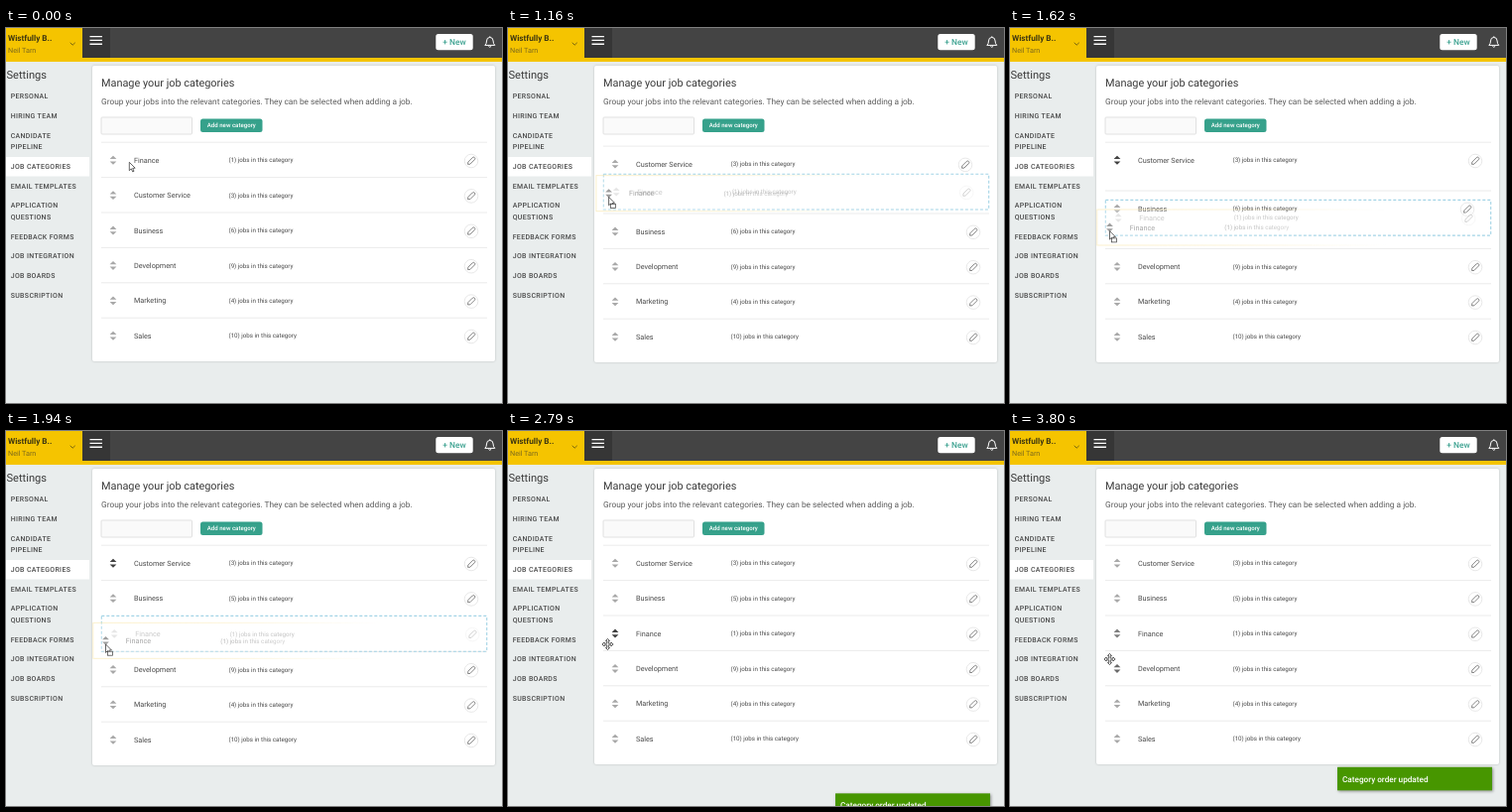
Animation, 500 px wide and 378 px high, one loop 3880 ms. Source, as an HTML page:

```html
<!DOCTYPE html>
<html lang="en">
<head>
<meta charset="utf-8">
<title>Job categories</title>
<style>
  html, body { margin: 0; width: 100%; height: 100%; overflow: hidden; background: #e9eded; }
  svg { display: block; width: 500px; height: 378px; font-family: Roboto, sans-serif; text-rendering: geometricPrecision; }
  .nav { font-size: 6.95px; font-weight: 500; letter-spacing: .36px; fill: #484848; }
  .name { font-size: 7.26px; fill: #4a4a4a; }
  .count { font-size: 6.23px; fill: #4a4a4a; }
  .card { filter: drop-shadow(0 .5px .8px #0003); }
  .toast { filter: drop-shadow(1.5px 1.5px 1.5px #0006); }
</style>
</head>
<body>
<svg viewBox="0 0 500 378">
  <defs>
    <linearGradient id="fade">
      <stop offset="0" stop-color="#fff"/>
      <stop offset=".35" stop-color="#bbb"/>
      <stop offset=".75" stop-color="#000"/>
    </linearGradient>
    <mask id="soft" maskUnits="userSpaceOnUse" x="80" y="-20" width="410" height="40">
      <rect x="80" y="-20" width="410" height="40" fill="url(#fade)"/>
    </mask>
    <g id="pencil">
      <circle r="6.8" fill="#fff" stroke="#e2e2e2" stroke-width=".8"/>
      <path d="M-4.8 0 L-3 -1.5 H3.4 Q4.8 -1.5 4.8 0 Q4.8 1.5 3.4 1.5 H-3 Z"
        transform="rotate(-45)" fill="none" stroke="#666" stroke-width=".75" stroke-linejoin="round"/>
    </g>
    <path id="sort" d="M-3.4 -1.1 L0 -4.4 L3.4 -1.1 Z M-3.4 1.2 L0 4.5 L3.4 1.2 Z"/>
  </defs>

  <rect width="500" height="378" fill="#e9eded"/>
  <rect width="500" height="30" fill="#444"/>
  <rect x="77" width="28" height="30" fill="#363636"/>
  <path d="M0 0 H77 V30 H500 V34 H0 Z" fill="#f5c400"/>
  <text x="2" y="13" font-size="8.2" font-weight="700" fill="#3d3610">Wistfully B..</text>
  <text x="2" y="24.6" font-size="7.2" fill="#7d6a1c">Neil Tarn</text>
  <path d="M64.7 14.8 L67.2 17.2 L69.7 14.8" fill="none" stroke="#6b5a10" stroke-width=".9"/>
  <path d="M84.5 8.6 H97 M84.5 12.4 H97 M84.5 16.2 H97" stroke="#fff" stroke-width="1.4"/>
  <rect x="433.3" y="6" width="37.4" height="16.3" rx="2.5" fill="#fff"/>
  <text x="452" y="17.2" font-size="8.4" font-weight="500" fill="#3fa392" text-anchor="middle">+ New</text>
  <path d="M482.8 17.4 Q484.5 16 484.5 13 Q484.5 9.6 487.8 9.4 Q491.1 9.6 491.1 13 Q491.1 16 492.8 17.4 Z M486.4 18.3 Q487.8 20.3 489.2 18.3 M487.8 9.4 V8.3"
    fill="none" stroke="#fff" stroke-width="1"/>

  <text x=".5" y="50.8" font-size="11.1" fill="#3a3a3a">Settings</text>
  <rect y="130" width="84" height="19.5" fill="#fff"/>
  <g id="nav"></g>

  <rect id="card" class="card" x="87" y="38" width="406" height="298" rx="2" fill="#fff"/>
  <text x="96" y="58.8" font-size="10.9" fill="#3a3a3a">Manage your job categories</text>
  <text x="96" y="77.2" font-size="8.32" fill="#5c5c5c">Group your jobs into the relevant categories. They can be selected when adding a job.</text>
  <rect x="96" y="90" width="91.5" height="17" rx="1" fill="#fafafa" stroke="#dedede" stroke-width=".9"/>
  <rect x="196" y="91.5" width="62.5" height="13.5" rx="2.5" fill="#36a18b"/>
  <text x="227.3" y="100.4" font-size="6.1" font-weight="500" fill="#fff" text-anchor="middle">Add new category</text>

  <g id="rows"></g>

  <g id="ghost">
    <g mask="url(#soft)">
      <rect x="96" y="-18" width="389" height="36" fill="#fff" fill-opacity=".25" stroke="#f8e7b0" stroke-opacity=".75" stroke-width=".9"/>
      <use href="#sort" x="108.7" fill="#999"/>
      <text class="name" x="129" y="2.6" opacity=".55">Finance</text>
      <text class="count" x="224.5" y="2.2" opacity=".55">(1) jobs in this category</text>
    </g>
  </g>

  <g id="toast" class="toast">
    <rect x="330" width="156" height="23.5" fill="#479600"/>
    <text x="335" y="14.8" font-size="8.2" font-weight="500" fill="#fff">Category order updated</text>
  </g>

  <g id="cursor">
    <path id="arrow" d="M0 0 V8.4 L2 6.6 L3.4 9.6 L4.7 9 L3.4 6.1 L5.9 5.9 Z" fill="#fff" stroke="#333" stroke-width=".75"/>
    <rect id="box" x="2" y="7.2" width="5" height="4" fill="#fff" stroke="#444" stroke-width=".75"/>
    <path id="move" d="M0 -5.6 L2 -3.4 H.8 V-.8 H3.4 V-2 L5.6 0 L3.4 2 V.8 H.8 V3.4 H2 L0 5.6 L-2 3.4 H-.8 V.8 H-3.4 V2 L-5.6 0 L-3.4 -2 V-.8 H-.8 V-3.4 H-2 Z"
      fill="#fff" stroke="#333" stroke-width=".8"/>
  </g>
</svg>
<script>
const LOOP = 3880, STEP = LOOP / 50;
const DRAG = 720, LIFT = 840, DROP = 2480, LEAVE = 3650;
const SWAP = 150, FADE = 250;
const TOP = 133.2, PITCH = 35.4;
const $ = id => document.getElementById(id);

function add(parent, tag, attrs, text) {
  const el = document.createElementNS('http://www.w3.org/2000/svg', tag);
  for (const k in attrs) el.setAttribute(k, attrs[k]);
  if (text) el.textContent = text;
  return parent.appendChild(el);
}
const move = (el, x, y) => el.setAttribute('transform', `translate(${x} ${y})`);
const show = (el, on) => el.setAttribute('visibility', on ? 'visible' : 'hidden');
const ramp = (t, from, to) => Math.min(1, Math.max(0, (t - from) / (to - from)));
const easeOut = (u, power) => 1 - (1 - u) ** power;
const mix = (a, b, u) => a + (b - a) * u;

let navY = 71.4;
for (const item of ['PERSONAL', 'HIRING TEAM', 'CANDIDATE|PIPELINE', 'JOB CATEGORIES', 'EMAIL TEMPLATES',
  'APPLICATION|QUESTIONS', 'FEEDBACK FORMS', 'JOB INTEGRATION', 'JOB BOARDS', 'SUBSCRIPTION']) {
  item.split('|').forEach((label, i) => {
    navY += i * 11.3;
    add($('nav'), 'text', { class: 'nav', x: 4.7, y: navY }, label);
  });
  navY += 19.75;
}

const jobs = n => `(${n}) jobs in this category`;

function makeRow([name, n]) {
  const g = add($('rows'), 'g');
  const line = add(g, 'path', { d: 'M96 -18 H485', stroke: '#e9e9e9', 'stroke-width': .9 });
  const body = add(g, 'g');
  const sort = add(body, 'use', { href: '#sort', x: 108 });
  add(body, 'text', { class: 'name', x: 129, y: 2.6 }, name);
  const count = add(body, 'text', { class: 'count', x: 224.5, y: 2.2 }, jobs(n));
  const pencil = add(body, 'use', { href: '#pencil', x: 469, y: .8 });
  return { g, line, body, sort, count, pencil };
}
const rows = Object.entries({ Finance: 1, 'Customer Service': 3, Business: 6,
  Development: 9, Marketing: 4, Sales: 10 }).map(makeRow);
const [finance, service, business, development] = rows;
$('rows').append(finance.g);
const dashes = add(finance.g, 'rect', { x: 96.3, y: -17.9, width: 388.4, height: 35.8, fill: 'none',
  stroke: '#a3d4e6', 'stroke-width': 1.1, 'stroke-dasharray': '3 2' });

// Pointer over a row's handle: [enter, leave].
finance.hover = [DROP, LEAVE];
service.hover = [1240, DROP - STEP];
development.hover = [LEAVE, LOOP];

function pointer(t) {
  const reach = ramp(t, 0, 2 * STEP), drag = ramp(t, LIFT, 1940), leave = ramp(t, LEAVE - STEP, LOOP - STEP);
  return [
    mix(124.3, 109.5, reach) - 9 * easeOut(drag, 6),
    mix(135.3, 137, reach) + 78 * easeOut(drag, 1.6) + 15 * leave
  ];
}

function render(now) {
  // The picture advances in even steps, as a screen recording does.
  const t = Math.floor((now + 12) / STEP) * STEP;
  const dragging = now >= DRAG && t < DROP, lifted = t >= LIFT && t < DROP;

  const a = ramp(t, 1030, 1030 + SWAP), b = ramp(t, 1535, 1535 + SWAP);
  const shift = [a + b, -a, -b];
  const gap = [.3, 1 - a, 1 - b];
  const swapping = [a % 1 + b % 1, a % 1, b % 1];

  rows.forEach((row, i) => {
    move(row.g, 0, TOP + PITCH * (i + (shift[i] ?? 0)) + (dragging ? gap[i] ?? 1 : 0));
    // Rows in transit are narrower, which pulls their edit button in.
    row.pencil.setAttribute('x', swapping[i] ? 461 : 469);
    const [enter, leave] = row.hover ?? [LOOP, LOOP];
    const shade = mix(168, 64, ramp(t, enter, enter + FADE) - ramp(t, leave, leave + FADE));
    row.sort.setAttribute('fill', `rgb(${shade},${shade},${shade})`);
  });

  business.count.textContent = jobs(t < 1860 ? 6 : 5);
  finance.body.setAttribute('opacity', dragging ? .36 : 1);
  move(finance.body, dragging ? 1.2 : 0, 0);
  show(finance.line, !dragging);
  show(dashes, dragging);
  $('card').setAttribute('height', dragging ? 299 : 298);

  const [x, y] = pointer(t);
  move($('cursor'), x, y);
  show($('arrow'), t < 2 * STEP || lifted);
  show($('box'), lifted);
  show($('move'), t >= 2 * STEP && !lifted);
  show($('ghost'), lifted);
  move($('ghost'), x - 108.7, y - 3.7);
  move($('toast'), 0, mix(378, 338.8, easeOut(ramp(t, 35 * STEP, 40 * STEP), 1.75)));
  show($('toast'), t > 35 * STEP);
}

const start = performance.now();
function tick() {
  render((performance.now() - start) % LOOP);
  requestAnimationFrame(tick);
}
tick();
</script>
</body>
</html>
```
